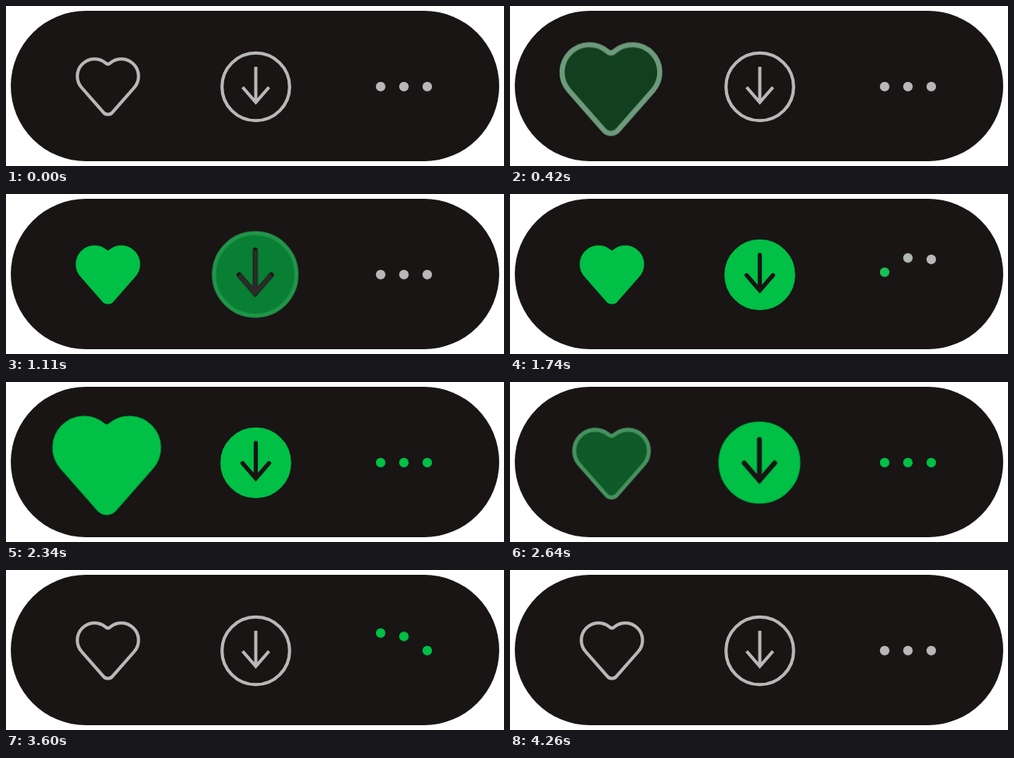
An HTML page for the animation above (4500 ms loop, 623 by 200 pixels).

```html
<!DOCTYPE html>
<html lang="en">
<head>
<meta charset="utf-8">
<title>Action bar</title>
<style>
  :root { --grey: #b9b8b8; --green: #00c046; --dark: #181514; }
  html, body { margin: 0; width: 100%; height: 100%; overflow: hidden; background: #fff; }
  svg { display: block; width: 623px; height: 200px; }

  .line { fill: none; stroke: var(--grey); stroke-width: 4; }
  .solid { fill: var(--green); stroke: var(--green); stroke-width: 4; }
  .solid .arrow { fill: none; stroke: var(--dark); stroke-width: 5.2; stroke-linecap: round; }

  .heart, .load, .line, .solid, .dot { animation: 4500ms linear infinite; }
  .heart, .load { animation-timing-function: cubic-bezier(.37, 0, .63, 1); }
  .heart { transform-origin: 129.7px 96px; animation-name: heart-pulse; }
  .load { transform-origin: 316px 103px; animation-name: load-pulse; }
  .heart .line { animation-name: heart-off; }
  .heart .solid { animation-name: heart-on; }
  .load .line { animation-name: load-off; }
  .load .solid { animation-name: load-on; }
  .dot { fill: var(--grey); animation-name: hop; animation-timing-function: ease; }
  .dot:nth-child(2) { animation-delay: 150ms; }
  .dot:nth-child(3) { animation-delay: 300ms; }

  @keyframes heart-pulse {
    0%, 2%, 15.33%, 45.11%, 62%, 100% { transform: scale(1); }
    7.11%, 53.11% { transform: scale(1.72); }
  }
  @keyframes load-pulse {
    0%, 11.11%, 28%, 56.22%, 73.11%, 100% { transform: scale(1); }
    19.11%, 64.22% { transform: scale(1.72); }
  }
  @keyframes heart-on {
    0%, 7.78%, 62%, 100% { opacity: 0; }
    14%, 54% { opacity: 1; }
  }
  @keyframes heart-off {
    0%, 7.78%, 62%, 100% { opacity: 1; }
    14%, 54% { opacity: 0; }
  }
  @keyframes load-on {
    0%, 20%, 73.11%, 100% { opacity: 0; }
    27.47%, 65.78% { opacity: 1; }
  }
  @keyframes load-off {
    0%, 20%, 73.11%, 100% { opacity: 1; }
    27.47%, 65.78% { opacity: 0; }
  }
  @keyframes hop {
    0%, 28.22% { transform: none; fill: var(--grey); }
    34.89% { transform: translateY(-22px); fill: var(--grey); }
    41.56%, 73.33% { transform: none; fill: var(--green); }
    80% { transform: translateY(-22px); fill: var(--green); }
    86.67%, 100% { transform: none; fill: var(--grey); }
  }
</style>
</head>
<body>
<svg viewBox="0 0 623 200">
  <defs>
    <path id="heart" d="M124.5 71.2A21.5 21.5 0 0 0 94.4 101.7L122 133.1A7.3 7.3 0 0 0 133 133.1L160.6 101.7A21.5 21.5 0 0 0 130.5 71.2Q127.5 74 124.5 71.2Z"/>
    <circle id="ring" cx="312.5" cy="101" r="42.3"/>
    <path id="arrow" d="M312.5 76V120.5M296 101.5L312.5 120.5L329 101.5"/>
  </defs>
  <rect x="6" y="6" width="611" height="188" rx="94" fill="#181514"/>
  <g class="heart">
    <use href="#heart" class="line"/>
    <use href="#heart" class="solid"/>
  </g>
  <g class="load">
    <g class="line"><use href="#ring"/><use href="#arrow"/></g>
    <g class="solid"><use href="#ring"/><use href="#arrow" class="arrow"/></g>
  </g>
  <g>
    <circle class="dot" cx="468.7" cy="100.8" r="6"/>
    <circle class="dot" cx="497.8" cy="100.8" r="6"/>
    <circle class="dot" cx="527" cy="100.8" r="6"/>
  </g>
</svg>
</body>
</html>
```
